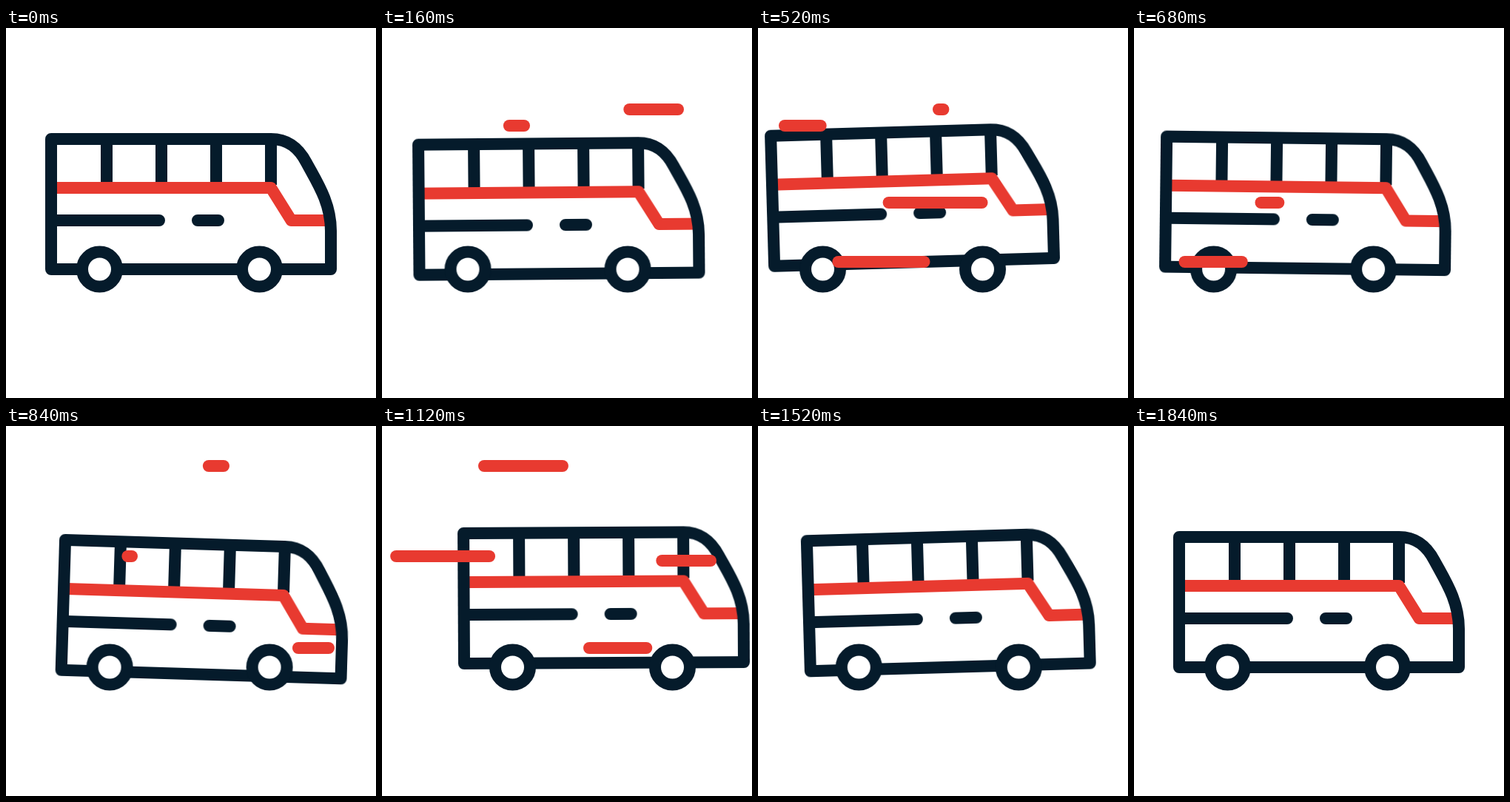
An HTML page without scripts that plays this animation: 500 px wide and 500 px high, repeating every 2 s.

```html
<!DOCTYPE html>
<html lang="en">
<head>
<meta charset="utf-8">
<title>Bus</title>
<style>
@property --head { syntax: "<length>"; inherits: false; initial-value: 0px; }
@property --tail { syntax: "<length>"; inherits: false; initial-value: 0px; }

html, body { margin: 0; width: 100%; height: 100%; overflow: hidden; background: #fff; }
svg { display: block; width: 100%; height: 100%; }

.ink, .red {
  fill: none;
  stroke: #051b2b;
  stroke-width: 16;
  stroke-linecap: round;
  stroke-linejoin: round;
}
.red { stroke: #e83a30; }
.flat { stroke-linecap: butt; }
.wheel { fill: #fff; }

.drive, .bounce, .tilt {
  animation: 2s cubic-bezier(.333, 0, .667, 1) infinite;
}
.drive { animation-name: drive; }
.bounce { animation-name: bounce; }
.tilt { animation-name: tilt; transform-origin: 250px 326px; }

@keyframes drive {
  0%, 84%, 100% { transform: translateX(0); }
  24% { transform: translateX(-40px); }
  56% { transform: translateX(50px); }
}
@keyframes bounce {
  0%, 78%, 100% { transform: translateY(0); }
  14% { transform: translateY(10px); }
  27% { transform: translateY(-10px); }
  42% { transform: translateY(9.6px); }
  57% { transform: translateY(-6.1px); }
}
@keyframes tilt {
  0%, 92%, 100% { transform: rotate(0deg); }
  24% { transform: rotate(-1.8deg); }
  40% { transform: rotate(1.8deg); }
  70% { transform: rotate(-2deg); }
}

/* Wind streaks: the head runs left, the tail follows */
.wind path {
  opacity: 0;
  stroke-dasharray: calc(var(--head) - var(--tail)) 999px;
  stroke-dashoffset: calc(var(--tail) * -1);
  animation:
    head 2s cubic-bezier(.333, 0, .667, 1) var(--at) infinite,
    tail 2s cubic-bezier(.333, 0, .667, 1) var(--at) infinite,
    show 2s step-end var(--at) infinite;
}
@keyframes head {
  0% { --head: 0px; }
  18%, 100% { --head: 156px; }
}
@keyframes tail {
  0%, 12% { --tail: 0px; }
  28%, 100% { --tail: 156px; }
}
@keyframes show {
  0% { opacity: 0; }
  .5% { opacity: 1; }
  28%, 100% { opacity: 0; }
}
</style>
</head>
<body>
<svg viewBox="0 0 500 500">
  <g class="drive">
    <g class="bounce">
      <g class="tilt">
        <path class="ink flat" d="M136 150v62M210 150v62M284 150v62M358 150v62"/>
        <path class="red flat" d="M62 216H358L385.500 260H436"/>
        <path class="ink" d="M61 260H207M259 260H287"/>
        <path class="ink" d="M61 150H358c24 0 38 13 48 32c14 26 33 54 33 92v52H61z"/>
      </g>
    </g>
    <circle class="ink wheel" cx="126.500" cy="326" r="23.500"/>
    <circle class="ink wheel" cx="342.500" cy="326" r="23.500"/>
  </g>
  <g class="wind">
    <path class="red" style="--at:0s" d="M400 110h-156"/>
    <path class="red" style="--at:.08s" d="M192 132h-156"/>
    <path class="red" style="--at:.2s" d="M327.500 236h-156"/>
    <path class="red" style="--at:.28s" d="M224.500 316h-156"/>
    <path class="red" style="--at:.72s" d="M436 300h-156"/>
    <path class="red" style="--at:.76s" d="M294 54h-156"/>
    <path class="red" style="--at:.8s" d="M170 176h-156"/>
    <path class="red" style="--at:.96s" d="M444 182h-156"/>
  </g>
</svg>
</body>
</html>
```
